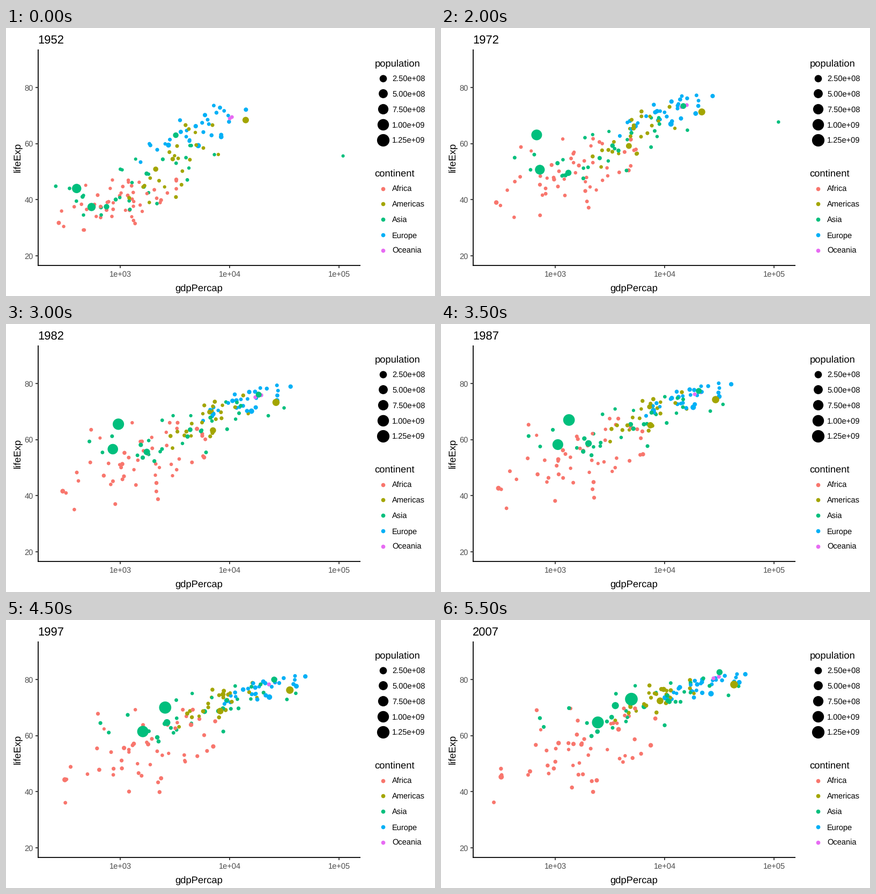
These frames come from a looping animation (800x500 px, 6000 ms). A matplotlib script:

```python
import matplotlib.pyplot as plt
import numpy as np
from matplotlib.animation import FuncAnimation

W, H, DPI = 800, 500, 100
PT = 72 / DPI
YEARS = np.arange(1952, 2008, 5)
PROGRESS = np.linspace(0, 1, len(YEARS))
COLORS = {"Africa": "#F8766D", "Americas": "#A3A500", "Asia": "#00BF7D",
          "Europe": "#00B0F6", "Oceania": "#E76BF3"}

plt.rcParams.update({"font.family": "Liberation Sans", "text.hinting": "none"})
rng = np.random.default_rng(7)

# Dot count, correlation, easing power, yearly population growth, then at both
# ends: mean and spread of log income, mean and spread of life expectancy
CLOUDS = {
    "Africa": (52, .4, 2.3, .025, (2.99, .29, 39.2, 5.0), (3.24, .42, 54.8, 9.3)),
    "Americas": (23, .65, 1.5, .017, (3.50, .22, 53.0, 8.5), (3.91, .25, 73.4, 4.0)),
    "Asia": (29, .7, 1.4, .020, (3.14, .40, 46.5, 8.0), (3.80, .47, 70.8, 6.0)),
    "Europe": (30, .8, 1.5, .005, (3.68, .26, 64.6, 5.6), (4.34, .22, 77.6, 2.7)),
    "Oceania": (2, .9, 1.0, .015, (4.01, .01, 69.2, .2), (4.47, .07, 80.7, .6)),
}
# The most visible dots: continent, population in millions at both ends,
# and a few turning points as (year, income, life expectancy)
LEADERS = [
    ("Asia", (82, 224), [(1952, 750, 37.5), (2007, 3541, 70.7)]),
    ("Asia", (86, 127), [(1952, 3217, 63), (1972, 14779, 73.4), (2007, 31656, 82.6)]),
    ("Americas", (57, 190), [(1952, 2109, 50.9), (1982, 7031, 63.3), (2007, 9066, 72.4)]),
    ("Asia", (.2, 2.5), [(1952, 108382, 55.6), (1972, 109348, 67.7),
                         (1982, 31354, 71.3), (2007, 47307, 77.6)]),
    ("Asia", (556, 1319), [(1952, 400, 44), (1957, 576, 50.5), (1962, 488, 44.5),
                           (1972, 677, 63.1), (1982, 962, 65.5), (2007, 4959, 73)]),
    ("Asia", (372, 1110), [(1952, 547, 37.4), (1972, 724, 50.7),
                           (1982, 856, 56.6), (2007, 2452, 64.7)]),
    ("Americas", (158, 301), [(1952, 13990, 68.4), (1972, 21806, 71.3),
                              (2007, 42952, 78.2)]),
]


def px_x(log_income):
    return 213 + 204.2 * (np.asarray(log_income) - 3)


def px_y(life):
    return 425 - 5.233 * (np.asarray(life) - 20)


def diameter(millions):
    return 5.92 + 17.78 * np.sqrt(np.asarray(millions) / 1319)


def marker_area(d):
    return (np.asarray(d) * PT) ** 2


def latent(n):
    z = rng.standard_normal(n)
    return np.clip((z - z.mean()) / z.std(), -1.9, 1.8)


def drifting(n):
    """Standard scores, one row per dot, that slowly change rank over the years."""
    start = latent(n)
    end = .85 * start + .5 * latent(n)
    return start[:, None] + (end - start)[:, None] * PROGRESS


def cloud_tracks(name):
    count, corr, power, growth, start, end = CLOUDS[name]
    eased = 1 - (1 - PROGRESS) ** power
    mean_x, sd_x, mean_y, sd_y = (a + (b - a) * eased for a, b in zip(start, end))
    wealth = drifting(count)
    health = corr * wealth + np.sqrt(1 - corr ** 2) * drifting(count)
    x = mean_x + sd_x * np.clip(wealth, -2, 1.8)
    y = mean_y + sd_y * np.clip(health, -2, 1.6)
    final = np.minimum(10 ** rng.normal(.95, .43, count), 85)
    people = final[:, None] * (1 + growth) ** (YEARS - 2007.0)
    return [(*track, COLORS[name]) for track in zip(x, y, people)]


def leader_track(name, people, points):
    years, income, life = zip(*points)
    return (np.interp(YEARS, years, np.log10(income)), np.interp(YEARS, years, life),
            np.linspace(*people, len(YEARS)), COLORS[name])


cloud = [track for name in CLOUDS for track in cloud_tracks(name)]
tracks = [cloud[i] for i in rng.permutation(len(cloud))]
tracks += [leader_track(*leader) for leader in LEADERS]
xs = px_x([t[0] for t in tracks])
ys = px_y([t[1] for t in tracks])
areas = marker_area(diameter([t[2] for t in tracks]))

fig = plt.figure(figsize=(W / DPI, H / DPI), dpi=DPI, facecolor="white")
ax = fig.add_axes([0, 0, 1, 1])
ax.set(xlim=(0, W), ylim=(H, 0))
ax.axis("off")


def label(x, y, text, size, color="black", **kw):
    return ax.text(x, y, text, fontsize=size * PT, color=color, va="baseline", **kw)


def line(x, y, color="black"):
    ax.plot(x, y, color=color, lw=1.78 * PT, solid_capstyle="butt", zorder=3)


SMALL, MEDIUM, LARGE = 14.67, 18.33, 22
line((60, 60), (40, 444))
line((59, 661), (443, 443))
for life in (20, 40, 60, 80):
    y = px_y(life)
    line((55, 59.5), (y, y), "#333333")
    label(51, y + 5.4, str(life), SMALL, "#4D4D4D", ha="right")
for power in (3, 4, 5):
    x = px_x(power)
    line((x, x), (443.5, 448), "#333333")
    label(x, 464.3, f"1e+0{power}", SMALL, "#4D4D4D", ha="center")
label(360, 490, "gdpPercap", MEDIUM, ha="center")
label(26, 241.5, "lifeExp", MEDIUM, ha="center", rotation=90, rotation_mode="anchor")
title = label(59, 29, "", LARGE)

label(687.5, 71, "population", MEDIUM)
label(687.5, 277, "continent", MEDIUM)
for i in range(5):
    y = 93.6 + 28.8 * i
    millions = 250 * (i + 1)
    ax.scatter(703, y, s=marker_area(diameter(millions)), c="black", lw=0)
    label(720, y + 5.4, f"{millions * 1e6:.2e}", SMALL)
for i, (name, color) in enumerate(COLORS.items()):
    y = 299.6 + 28.8 * i
    ax.scatter(703, y, s=marker_area(7.7), c=color, lw=0)
    label(720, y + 5.4, name, SMALL)

dots = ax.scatter(xs[:, 0], ys[:, 0], s=areas[:, 0], c=[t[3] for t in tracks], lw=0)


def update(i):
    dots.set_offsets(np.column_stack((xs[:, i], ys[:, i])))
    dots.set_sizes(areas[:, i])
    title.set_text(str(YEARS[i]))
    return dots, title


anim = FuncAnimation(fig, update, frames=len(YEARS), interval=500,
                     repeat=True, repeat_delay=0)
plt.show()
```
